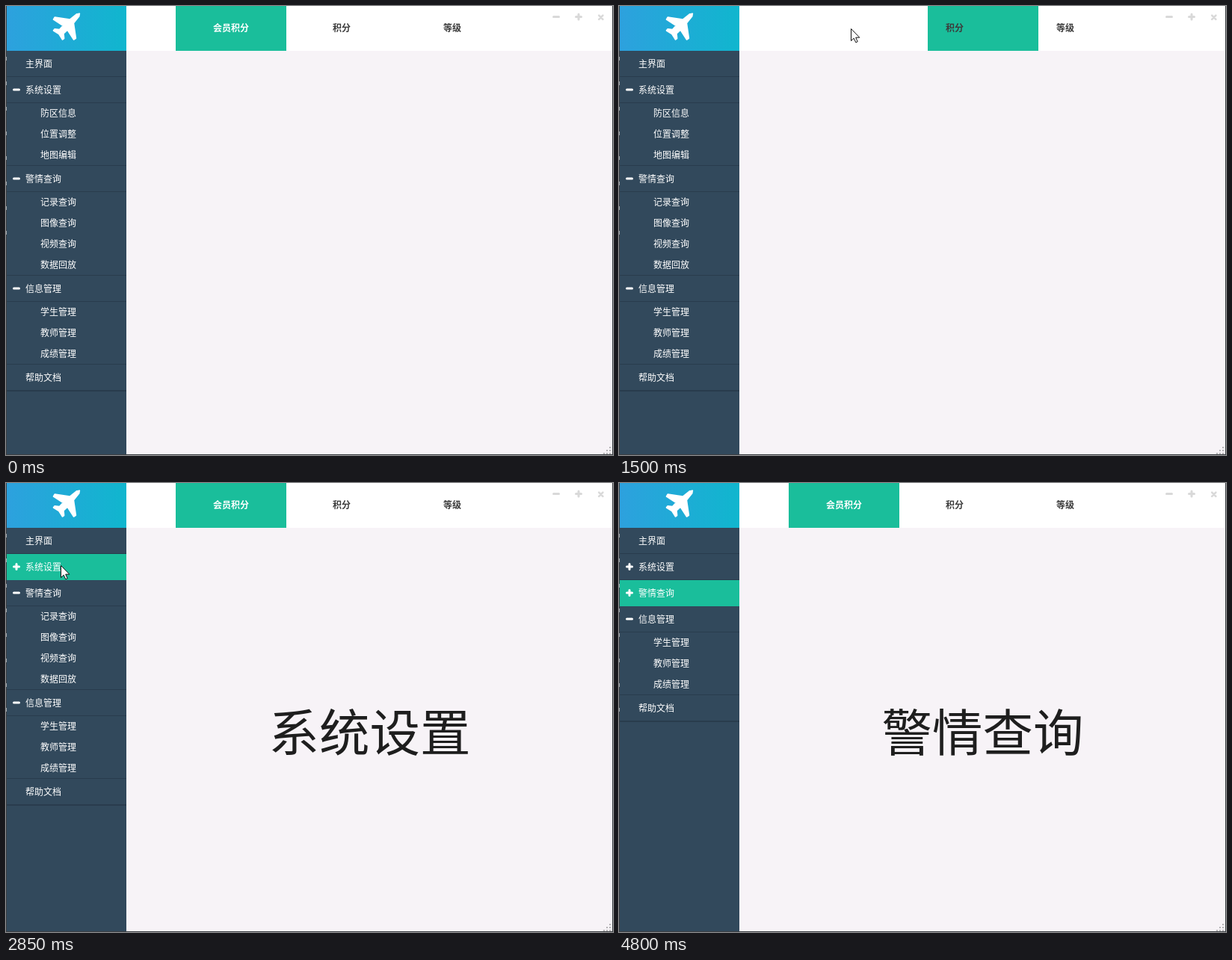
An HTML page that plays this animation: 812 by 601 pixels, repeating every 5.25 s.

```html
<!DOCTYPE html>
<html lang="zh-CN">
<head>
<meta charset="utf-8">
<style>
  html, body { margin: 0; width: 100%; height: 100%; overflow: hidden; }
  svg { display: block; width: 812px; height: 601px; }
  text { font: 12px "Noto Sans CJK SC", "Noto Sans CJK", "Noto Sans CJK JP", sans-serif; fill: #fff; }
  .tab { font-weight: bold; text-anchor: middle; }
  #title { font-size: 67.5px; fill: #1e1e1e; text-anchor: middle; }
</style>
</head>
<body>
<svg viewBox="0 0 812 601">
  <defs>
    <linearGradient id="sky"><stop stop-color="#2da1de"/><stop offset="1" stop-color="#10b6ce"/></linearGradient>
  </defs>
  <rect width="812" height="601" fill="#3b3f43"/>
  <g id="edge" fill="#a8abad"></g>
  <rect x="1" width="160" height="60" fill="url(#sky)"/>
  <rect x="161" width="650" height="60" fill="#fff"/>
  <rect x="161" y="60" width="650" height="540" fill="#f7f3f7"/>
  <rect x="1" y="60" width="160" height="540" fill="#32495c"/>
  <polygon id="plane" fill="#fff" stroke="#fff" stroke-width="2" stroke-linejoin="round" transform="translate(62.2 8.8)"/>
  <rect id="slider" width="148" height="60" fill="#1abe9b"/>
  <g id="tabs"></g>
  <g stroke="#d9d9d9" stroke-width="3" stroke-linecap="round">
    <path d="M732.5 14.5h7M762.5 14.5h7M766 11v7"/>
    <path d="M793.2 12.7l5.2 5.2m0-5.2l-5.2 5.2" stroke-width="2.6"/>
  </g>
  <g id="grip" fill="#b5b3b6"></g>
  <g id="menu"></g>
  <text id="title" x="486.5" y="358.5"></text>
  <path id="cursor" d="M.5 .5V16.6L4.2 13.2L6.8 18.8L9.2 17.7L6.7 12.2H11.8Z" fill="#fff" stroke="#111"/>
</svg>
<script>
const NS = "http://www.w3.org/2000/svg";
const byId = id => document.getElementById(id);
const LOOP = 5250, TICK = 150, TAB_LEFT = 227, TAB_WIDTH = 148;
const GREEN = "#1abe9b";

const groups = [
  ["主界面"],
  ["系统设置", "防区信息", "位置调整", "地图编辑"],
  ["警情查询", "记录查询", "图像查询", "视频查询", "数据回放"],
  ["信息管理", "学生管理", "教师管理", "成绩管理"],
  ["帮助文档"]
];
const tabNames = ["会员积分", "积分", "等级"];

// Clicks: time and what was clicked
const tabClicks = [[0, 0], [450, 1], [901, 2], [1390, 0]];
const menuClicks = [[0, ""], [1950, "防区信息"], [2700, "系统设置"], [4350, "警情查询"]];
// Pointer stops: time, x, y
const stops = [
  [150, 440, 80], [450, 448, 31], [900, 596, 27], [1050, 596, 27], [1500, 310, 30],
  [1950, 97, 151], [2850, 73, 110], [3750, 74, 112], [4350, 76, 145], [4650, 240, 150]
];

function add(parent, tag, attrs, text) {
  const node = document.createElementNS(NS, tag);
  for (const key in attrs) node.setAttribute(key, attrs[key]);
  if (text) node.textContent = text;
  return parent.appendChild(node);
}

const past = (list, t) => list.filter(item => item[0] <= t);
const smooth = k => k * k * (3 - 2 * k);

// The plane is symmetric about its diagonal.
const half = [[35.8, 1.5], [35.4, 4.8], [28, 14.2], [31, 34.4], [28.4, 36], [20, 23],
  [14.6, 28], [15.2, 34.6], [13.4, 36], [8.8, 28.7]];
const mirrored = half.map(([x, y]) => [37.5 - y, 37.5 - x]).reverse();
byId("plane").setAttribute("points", half.concat(mirrored).join(" "));

const tabs = tabNames.map((name, i) =>
  add(byId("tabs"), "text", { class: "tab", x: TAB_LEFT + TAB_WIDTH * (i + 0.5), y: 34 }, name));

for (let row = 0; row < 3; row++)
  for (let col = 0; col <= row; col++)
    add(byId("grip"), "rect", { x: 807 - 4 * col, y: 590 + 4 * row, width: 2, height: 2 });

// Scraps of the window behind show along the left edge.
for (let i = 0; i < 8; i++)
  add(byId("edge"), "rect", { x: 0, y: 68 + Math.round(33.3 * i), width: 1, height: 5 });

function drawMenu(selected, closed) {
  const menu = byId("menu");
  menu.replaceChildren();
  let y = 60;
  const line = height =>
    add(menu, "rect", { x: 1, y: y - 1, width: 160, height, fill: "#293c4d" });
  const row = (name, x, height) => {
    if (name === selected) add(menu, "rect", { x: 1, y, width: 160, height, fill: GREEN });
    add(menu, "text", { x, y: y + Math.floor(height / 2 + 4.5) }, name);
    y += height;
  };
  for (const [head, ...items] of groups) {
    const shut = closed.includes(head);
    row(head, 26, 35);
    if (head !== selected) line(head === groups.at(-1)[0] ? 2 : 1);
    if (!items.length) continue;
    const mid = y - 18;
    add(menu, "path", {
      d: `M10.5 ${mid}h7` + (shut ? `M14 ${mid - 3.5}v7` : ""),
      stroke: "#fff", "stroke-width": 3, "stroke-linecap": "round"
    });
    if (shut) continue;
    items.forEach(item => row(item, 46, 28));
    line(1);
  }
}

// The slider glides at 1 px per ms from the previous tab to the clicked one.
function drawTabs(t) {
  const [[start, index], [, from] = [0, 0]] = past(tabClicks, t).reverse();
  const distance = TAB_WIDTH * (index - from);
  const moved = Math.sign(distance) * Math.min(Math.abs(distance), t - start);
  byId("slider").setAttribute("x", TAB_LEFT + TAB_WIDTH * from + moved);
  tabs.forEach((tab, i) => { tab.style.fill = i === index ? "#fff" : "#3c3c3c"; });
}

function drawCursor(t) {
  const a = past(stops, t).pop(), b = stops.find(stop => stop[0] > t);
  byId("cursor").setAttribute("visibility", a && b ? "visible" : "hidden");
  if (!a || !b) return;
  const k = smooth((t - a[0]) / (b[0] - a[0]));
  const mix = n => Math.round(a[n] + (b[n] - a[n]) * k);
  byId("cursor").setAttribute("transform", `translate(${mix(1)} ${mix(2)})`);
}

function render(t) {
  const clicked = past(menuClicks, t).map(click => click[1]);
  const selected = clicked.at(-1);
  drawTabs(t);
  drawMenu(selected, clicked);
  byId("title").textContent = selected;
  drawCursor(t);
}

let origin, shown;
function frame(now) {
  origin ??= now;
  const t = Math.floor((now - origin) % LOOP / TICK) * TICK;
  if (t !== shown) render(shown = t);
  requestAnimationFrame(frame);
}
render(0);
requestAnimationFrame(frame);
</script>
</body>
</html>
```
